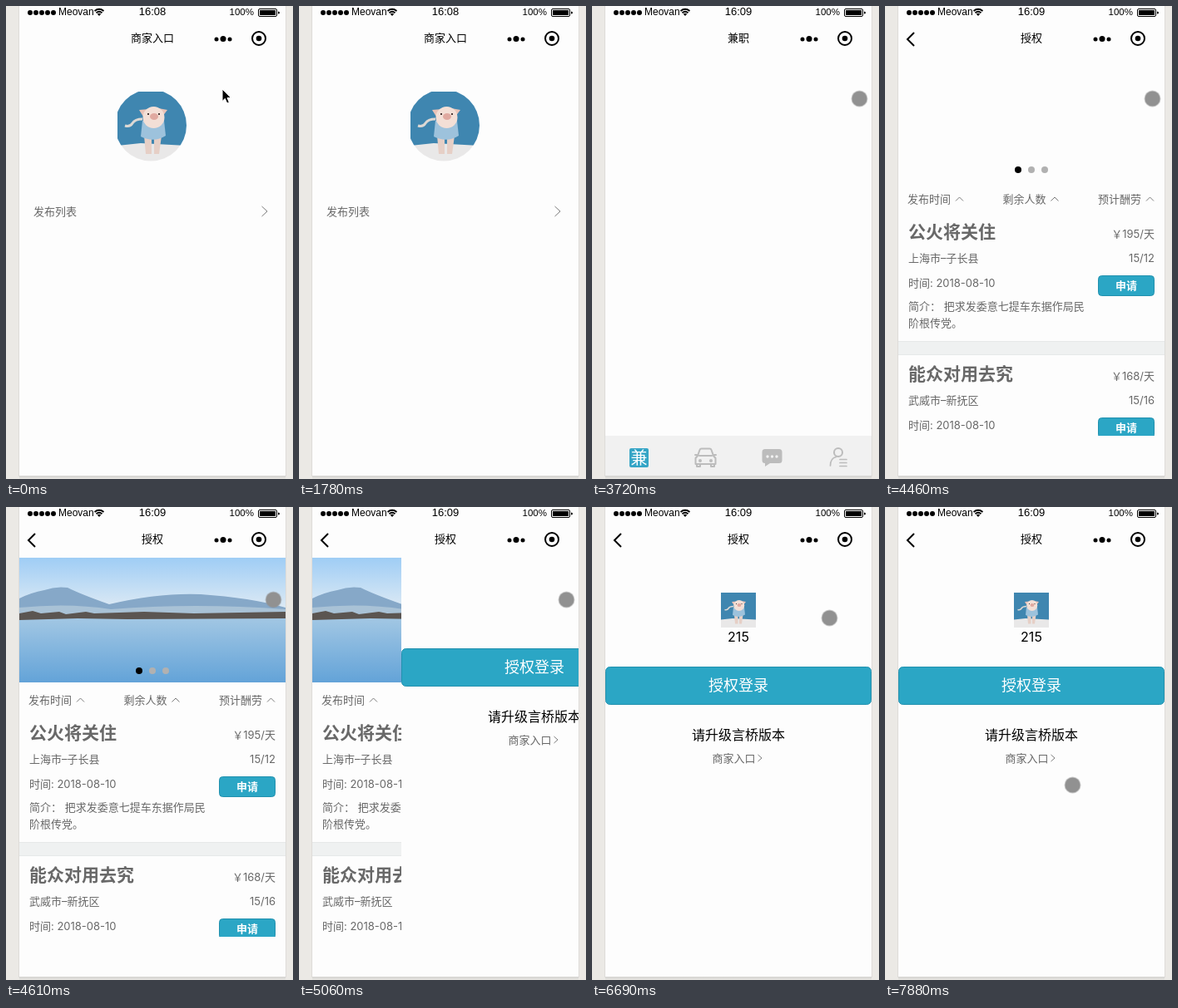
Write an HTML page that moves like this. It is 345 px wide and 569 px high and loops after 8000 ms.

```html
<!DOCTYPE html>
<html lang="zh-CN">
<head>
<meta charset="utf-8">
<title>授权登录</title>
<style>
html, body { margin: 0; width: 100%; height: 100%; overflow: hidden; background: #ebe9e5; }
svg { display: block; width: 345px; height: 569px; }
text { font: 13px Inter, "Noto Sans CJK SC", "Noto Sans CJK", sans-serif; }
.status text { font-family: "Liberation Sans", sans-serif; }
.mid { text-anchor: middle; }
.end { text-anchor: end; }
.soft { fill: #686868; }
.line { fill: none; stroke: #7b7b7b; }
.icon { fill: none; stroke: #bcbcbc; stroke-width: 2; stroke-linecap: round; stroke-linejoin: round; }
.btn { fill: #2ba6c5; stroke: #2291ae; }
.head { font-size: 21px; font-weight: 700; }

/* Every change is a hard cut within one 8 s loop */
.t { animation: 8s step-end infinite; }
.home { animation-name: home; }
.later { animation-name: later; }
.jobs { animation-name: jobs; }
.list { animation-name: list; }
.pager { animation-name: pager; }
.banner { animation-name: banner; }
.authbar { animation-name: authbar; }
.slide { animation-name: slide; }
.named { animation-name: named; }
.shift { animation-name: shift; }
.face { animation-name: face; }
.arrow { animation-name: arrow; }
.touch { animation-name: touch; }
@keyframes home { 0% { opacity: 1 } 37.125% { opacity: 0 } }
@keyframes later { 0% { opacity: 0 } 37.125% { opacity: 1 } }
@keyframes jobs { 0% { opacity: 0 } 37.125% { opacity: 1 } 55.75% { opacity: 0 } }
@keyframes list { 0% { opacity: 0 } 52.125% { opacity: 1 } }
@keyframes pager { 0% { opacity: 0 } 54% { opacity: 1 } }
@keyframes authbar { 0% { opacity: 0 } 55.75% { opacity: 1 } }
@keyframes banner { 0% { opacity: 0 } 57.625% { opacity: 1 } }
@keyframes slide {
  0% { transform: translateX(330px) }
  61.375% { transform: translateX(245px) }
  63.25% { transform: translateX(107px) }
  65.125% { transform: none }
}
@keyframes named { 0% { opacity: 0 } 78.125% { opacity: 1 } }
@keyframes shift { 0% { transform: translateY(-22px) } 78.125% { transform: none } }
@keyframes face { 0% { opacity: 0 } 83.625% { opacity: 1 } }
@keyframes arrow {
  0% { opacity: 1; transform: translate(260px, 100px) }
  5.5% { opacity: 1; transform: translate(256px, 107px) }
  7.375% { opacity: 1; transform: translate(249px, 118px) }
  9.125% { opacity: 1; transform: translate(243px, 128px) }
  11% { opacity: 1; transform: translate(240px, 132px) }
  22.25% { opacity: 0; transform: translate(240px, 132px) }
  39% { opacity: 1; transform: translate(334px, 110px) }
  42.75% { opacity: 1; transform: translate(320px, 110px) }
  46.5% { opacity: 0; transform: translate(320px, 110px) }
}
@keyframes touch {
  0% { opacity: 0; transform: translate(321.5px, 111.5px) }
  46.5% { opacity: 1; transform: translate(321.5px, 111.5px) }
  70.625% { opacity: 1; transform: translate(317px, 116px) }
  72.5% { opacity: 1; transform: translate(310.5px, 122.5px) }
  78.125% { opacity: 1; transform: translate(297px, 129px) }
  79.875% { opacity: 1; transform: translate(285.5px, 133.5px) }
  85.5% { opacity: 1; transform: translate(258px, 161.5px) }
  89.25% { opacity: 1; transform: translate(248px, 195px) }
  91.125% { opacity: 1; transform: translate(237px, 236px) }
  93% { opacity: 1; transform: translate(229px, 276px) }
  94.75% { opacity: 1; transform: translate(224px, 306px) }
  96.625% { opacity: 1; transform: translate(224px, 326px) }
  98.5% { opacity: 1; transform: translate(225.5px, 334.5px) }
}
</style>
</head>
<body>
<svg viewBox="0 0 345 569">
  <defs>
    <linearGradient id="edge" x2="0" y2="1"><stop stop-color="#d3d2d0"/><stop offset="1" stop-color="#e8e6e2"/></linearGradient>
    <linearGradient id="sky" x2="0" y2="1"><stop stop-color="#9fcdf5"/><stop offset="1" stop-color="#e6eef4"/></linearGradient>
    <linearGradient id="water" x2="0" y2="1"><stop stop-color="#a4c8e4"/><stop offset="1" stop-color="#63a3d8"/></linearGradient>
    <clipPath id="phone"><path d="M16 0h320v565H16z"/></clipPath>
    <clipPath id="feed"><path d="M16 211h320v306H16z"/></clipPath>
    <clipPath id="square"><path d="M134 103h83v84h-83z"/></clipPath>
    <clipPath id="round" clip-path="url(#square)"><circle cx="174" cy="143.5" r="43"/></clipPath>
    <g id="pet">
      <path fill="#3f86b0" d="M134 103h84v84h-84z"/>
      <path fill="#e9e8e8" d="M134 168l28-3 56 3v19h-84z"/>
      <path fill="none" stroke="#dcd8d4" stroke-width="3" d="M164 136q-9 0-12 5t-9 3"/>
      <path fill="#e6cfc6" d="M166 156h9v22h-7zM178 156h9l-3 22h-6z"/>
      <path fill="#9dc2dc" d="M164 138h26l2 18q-14 9-30 1z"/>
      <path fill="#e8c3b8" d="M165 133l-5-8 12-1zM188 133l6-8-11-2z"/>
      <ellipse fill="#f3dfd6" cx="177.500" cy="134" rx="13" ry="13"/>
      <ellipse fill="#e0a9a0" cx="178" cy="133" rx="5" ry="4"/>
      <path stroke="#4b3a38" stroke-width="2" d="M170 130h2M183 130h2"/>
    </g>
    <path id="up" class="line" d="M0 5.500L4.500 1 9 5.500"/>
  </defs>

  <path fill="#ebe9e5" d="M0 0h345v569H0z"/>
  <path fill="#dedcd9" d="M15 0h322v566H15z"/>
  <path fill="url(#edge)" d="M16 565h320v4H16z"/>
  <path fill="#fdfdfd" d="M16 0h320v565H16z"/>

  <g class="status">
    <path stroke="#000" stroke-width="6" stroke-linecap="round" stroke-dasharray="0 7" d="M29 8h28.500"/>
    <text x="63" y="11" style="font-size:12px">Meovan</text>
    <g fill="none" stroke="#000" stroke-width="1.800">
      <path d="M106.500 6q5.500-4.500 11 0M108.500 8.300q3.500-3 7 0"/>
      <path fill="#000" stroke="none" d="M109.700 9.600q2.300-1.600 4.600 0L112 12z"/>
    </g>
    <text class="mid t home" x="176" y="11">16:08</text>
    <text class="mid t later" x="176" y="11">16:09</text>
    <text class="end" x="298" y="11" style="font-size:11.500px">100%</text>
    <rect x="303.500" y="3.500" width="22" height="9" rx="1.500" fill="none" stroke="#000"/>
    <path d="M305 5h19v6h-19zM327 6.500q2 0 2 1.500t-2 1.500z"/>
  </g>
  <circle cx="253" cy="40" r="2.500"/><circle cx="261" cy="39.500" r="3.500"/><circle cx="269" cy="40" r="2.500"/>
  <circle cx="304" cy="39" r="8" fill="none" stroke="#000" stroke-width="2"/><circle cx="304" cy="39" r="3.300"/>

  <g class="t home">
    <text class="mid" x="176" y="43">商家入口</text>
    <use href="#pet" clip-path="url(#round)"/>
    <text class="soft" x="33" y="252">发布列表</text>
    <path class="line" d="M307.500 241l6.500 6-6.500 6"/>
  </g>

  <g class="t banner">
    <path fill="url(#sky)" d="M16 61h320v70H16z"/>
    <path fill="#86a8c8" d="M16 110q14-7 30-10 14-5 28-3 16 8 50 20 60-14 110-12 60 4 102 16v10H16z"/>
    <path fill="#a9c2d6" d="M16 121q60-6 110 2 100-8 210 0v8H16z"/>
    <path fill="url(#water)" d="M16 131h320v80H16z"/>
    <path fill="#5b5551" d="M16 128l16-3 10 3 22-2 8 3 24-3 10 2 60-2 60 2 110-2v8l-190 1-60-1-70 2z"/>
  </g>
  <g class="t pager">
    <circle cx="160" cy="197" r="4"/>
    <g fill="#b1b1b1"><circle cx="176" cy="197" r="4"/><circle cx="192" cy="197" r="4"/></g>
  </g>

  <g class="t list">
    <g class="soft" clip-path="url(#feed)">
      <text x="27" y="237">发布时间</text><use href="#up" x="85" y="229"/>
      <text x="141.500" y="237">剩余人数</text><use href="#up" x="199.500" y="229"/>
      <text x="256" y="237">预计酬劳</text><use href="#up" x="314" y="229"/>

      <text class="head" x="28" y="279">公火将关住</text>
      <text class="end" x="324" y="279">￥195/天</text>
      <text x="28" y="308">上海市–子长县</text>
      <text class="end" x="324" y="308">15/12</text>
      <text x="28" y="338">时间: 2018-08-10</text>
      <text x="28" y="366">简介： 把求发委意七提车东据作局民</text>
      <text x="28" y="386">阶根传党。</text>
      <rect class="btn" x="256.500" y="324.500" width="67" height="24" rx="4"/>
      <text class="mid" x="290" y="341" fill="#fff" font-weight="700" style="font-weight:700">申请</text>

      <path fill="#eff1f1" stroke="#e6e8e8" d="M15 403.500h322v16H15z"/>

      <text class="head" x="28" y="450">能众对用去究</text>
      <text class="end" x="324" y="450">￥168/天</text>
      <text x="28" y="479">武威市–新抚区</text>
      <text class="end" x="324" y="479">15/16</text>
      <text x="28" y="509">时间: 2018-08-10</text>
      <rect class="btn" x="256.500" y="495.500" width="67" height="24" rx="4"/>
      <text class="mid" x="290" y="512" fill="#fff" style="font-weight:700">申请</text>
    </g>
  </g>

  <g class="t jobs">
    <text class="mid" x="176" y="43">兼职</text>
    <path fill="#f1f1f1" d="M16 517h320v48H16z"/>
    <rect x="45" y="532" width="23" height="23" rx="2" fill="#35a5c6"/>
    <text class="mid" x="56.500" y="551" fill="#fff" style="font-size:20px">兼</text>
    <g class="icon">
      <path d="M127 541l2.500-7q.5-1.500 2-1.500h10q1.500 0 2 1.500l2.500 7 2.500 3v7h-24v-7zM124 540h2M147 540h2M126 551v3h4v-3M143 551v3h4v-3M129 541h15"/>
      <circle cx="296" cy="537" r="5"/>
      <path d="M286.500 553q0-9 7-10.500M298 545.500h8M298 549.500h8M298 553.500h8" stroke-width="1.700"/>
    </g>
    <g fill="#bcbcbc">
      <circle cx="130" cy="547" r="2"/><circle cx="143" cy="547" r="2"/>
      <path d="M208 533h17q3.500 0 3.500 3.500v10q0 3.500-3.500 3.500h-11l-6 4v-4q-3.500 0-3.500-3.500v-10q0-3.500 3.500-3.500z"/>
    </g>
    <path stroke="#f1f1f1" stroke-width="3.400" stroke-linecap="round" stroke-dasharray="0 5.500" d="M211 542h11.500"/>
  </g>

  <g class="t authbar">
    <path fill="none" stroke="#000" stroke-width="2" d="M35 32l-8 8 8 8"/>
    <text class="mid" x="176" y="43">授权</text>
  </g>

  <g clip-path="url(#phone)">
    <g class="t slide">
      <path fill="#fdfdfd" d="M16 61h320v504H16z"/>
      <use class="t face" href="#pet" transform="translate(88 51.500) scale(.5)"/>
      <text class="mid t named" x="176" y="162" style="font-size:16px">215</text>
      <g class="t shift">
        <rect class="btn" x="16.500" y="192.500" width="319" height="45" rx="5"/>
        <text class="mid" x="176" y="221" fill="#fff" style="font-size:18px;font-weight:500">授权登录</text>
        <text class="mid" x="176" y="280" style="font-size:16px">请升级言桥版本</text>
        <text class="soft" x="144.500" y="307">商家入口</text>
        <path class="line" d="M199.500 298l4.500 4-4.500 4"/>
      </g>
    </g>
  </g>

  <path class="t arrow" stroke="#fff" d="M0 0V14.500L3.300 11.400 5.700 17 8.300 15.900 6 10.500H10.500Z"/>
  <circle class="t touch" r="9.500" fill="#919191"/>
</svg>
</body>
</html>
```
